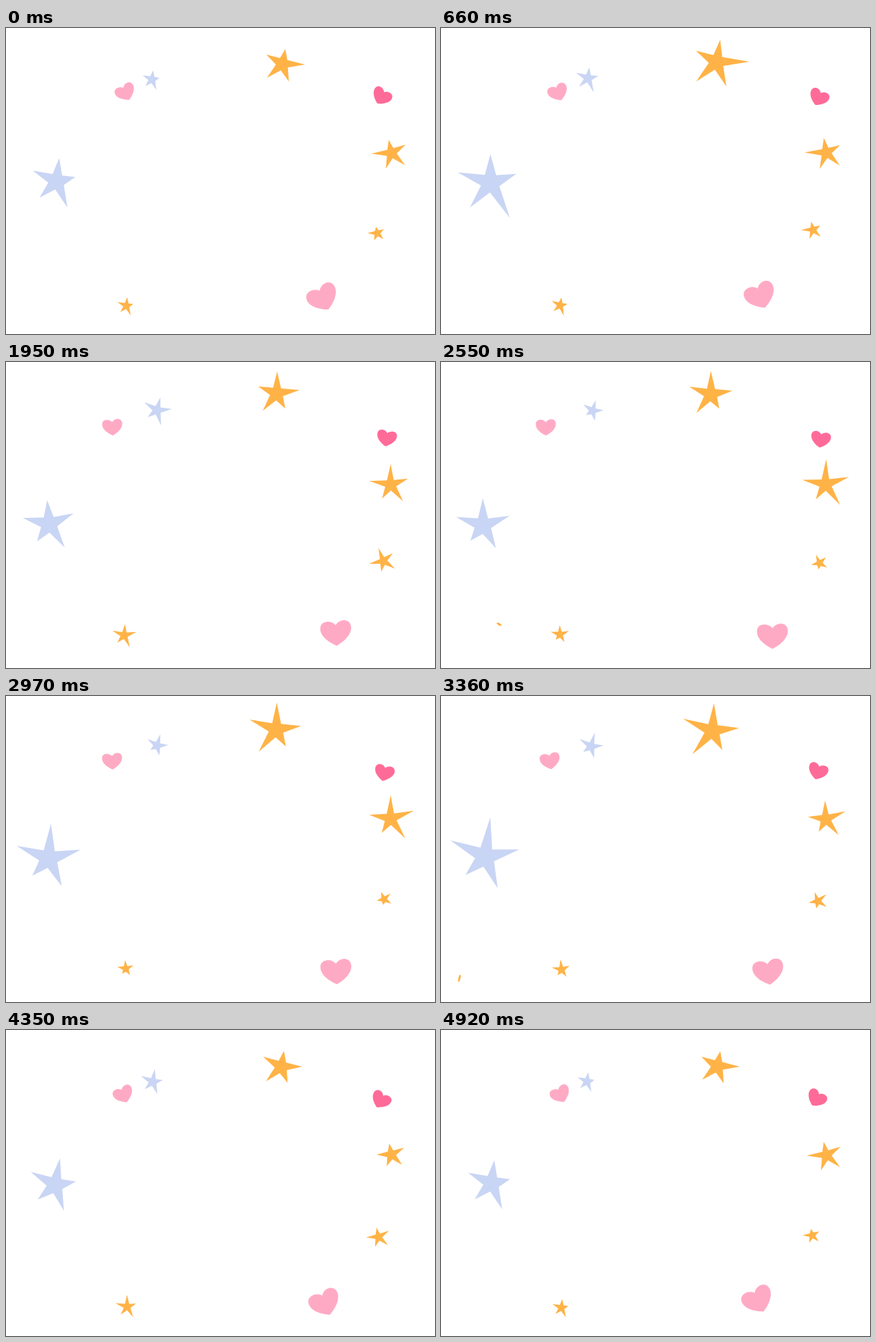
Animation of 645x461 px, one loop 4950 ms. Source, as an HTML page with a canvas:

```html
<!DOCTYPE html>
<html lang="en">
<head>
<meta charset="utf-8">
<title>Stars and hearts</title>
<style>
  html, body { margin: 0; width: 100%; height: 100%; overflow: hidden; background: #fff; }
  canvas { display: block; width: 645px; height: 461px; }
</style>
</head>
<body>
<canvas id="stage" width="645" height="461"></canvas>
<script>
const LOOP = 4950, STEP = 30;
const ORANGE = '#ffb347', BLUE = '#c9d5f4', PINK = '#ffaac5', ROSE = '#ff6b98', PURPLE = '#7a559b';
const ctx = document.getElementById('stage').getContext('2d');
const rad = degrees => degrees * Math.PI / 180;

// Mean value plus one swing per loop and, optionally, a second at double speed.
const wave = ([mean, c1, s1, c2 = 0, s2 = 0], a) =>
  mean + c1 * Math.cos(a) + s1 * Math.sin(a) + c2 * Math.cos(2 * a) + s2 * Math.sin(2 * a);

// The five tips of every star: reach, how far and when each one
// stretches during the loop, and its lean in degrees.
const TIPS = [
  { reach: 1.00, sway: 0.14, phase: 258, lean: -1.5 },
  { reach: 0.94, sway: 0.14, phase: 180, lean: -3 },
  { reach: 1.10, sway: 0.13, phase: 52, lean: 5 },
  { reach: 0.87, sway: 0.12, phase: 31, lean: 1.5 },
  { reach: 1.07, sway: 0.03, phase: 270, lean: -2 }
];

function star({ color, x, y, turn, size, body, flip = 1 }) {
  return a => {
    const length = wave(size, a);
    const inner = body + 0.17 * length;
    ctx.save();
    ctx.translate(wave(x, a), wave(y, a));
    ctx.rotate(rad(wave(turn, a)));
    ctx.scale(flip, 1);
    ctx.fillStyle = color;
    ctx.beginPath();
    const point = (r, degrees) => ctx.lineTo(r * Math.sin(rad(degrees)), -r * Math.cos(rad(degrees)));
    TIPS.forEach(({ reach, sway, phase, lean }, k) => {
      point(length * (reach + sway * Math.cos(a - rad(phase))), 72 * k + lean);
      point(inner, 72 * k + 36);
    });
    ctx.fill();
    ctx.restore();
  };
}

const heartPath = new Path2D('M0-12C3-17 9-19.6 14-18.8C20-18 23-13 23-8C23 4 10 14 0 19' +
  'C-10 14-23.5 5-23.5-7C-23.5-13-20-17-14-17.6C-9-18.3-3-16 0-12Z');

function heart({ color, x, y, turn, scale, flip = 1 }) {
  return a => {
    ctx.save();
    ctx.translate(wave(x, a), wave(y, a));
    ctx.rotate(rad(wave(turn, a)));
    ctx.scale(scale * flip, scale);
    ctx.fillStyle = color;
    ctx.fill(heartPath);
    ctx.restore();
  };
}

// A fleck of confetti that glints briefly.
function fleck(color, time, x, y, length, tilt) {
  return (a, t) => {
    if (Math.abs(t - time) > 75) return;
    ctx.fillStyle = color;
    ctx.beginPath();
    ctx.ellipse(x, y, length / 2, 1.6, rad(tilt), 0, Math.PI * 2);
    ctx.fill();
  };
}

const shapes = [
  star({ color: BLUE, body: 6.2, x: [68.9, 6.4, 0.5], y: [238, -7.5, -0.3],
    turn: [4.5, 3.8, -7], size: [44, -1, 0, -6.7, 5] }),
  star({ color: BLUE, body: 3, x: [223.2, -4.2, 0], y: [74.9, 2.2, -1.6],
    turn: [13.2, -5, -1.5], size: [19, -0.8, 2, -3.8, -1.5] }),
  star({ color: ORANGE, body: 4.8, x: [410, 5, 0.5], y: [51, 2.9, -2.8],
    turn: [-63.2, 5.4, 0], size: [35.5, -1.5, 1, -5, 4.5] }),
  star({ color: ORANGE, body: 3.6, flip: -1, x: [578.3, 0.7, 0], y: [186, 2, 0],
    turn: [64, -6.5, 0], size: [27, -4.7, 1, 3.3, 2.5] }),
  star({ color: ORANGE, body: 2.6, flip: -1, x: [563, -5.5, -0.8], y: [305.3, 3.3, -5.3],
    turn: [53, 6.5, 1], size: [16.2, -0.5, 2, -3.5, -3] }),
  star({ color: ORANGE, body: 2.5, x: [179.3, 1.2, -2], y: [414, 4, 0.7],
    turn: [3.7, 3, 7], size: [15.3, -0.2, 1, -1.6, -2.5] }),
  heart({ color: PINK, scale: 0.65, x: [168.3, 11.1, 0], y: [97.3, -0.7, 0], turn: [-13, -13, 0] }),
  heart({ color: PINK, scale: 1, x: [487.2, -10.9, 0], y: [409.2, -2.9, -5.6], turn: [-12.5, -12.5, 0] }),
  heart({ color: ROSE, scale: 0.64, flip: -1, x: [567.3, -3.3, 3], y: [109.6, -6.8, -0.8], turn: [18.5, 11.5, -3] }),
  fleck(PURPLE, 1380, 532, 395.5, 15, -10),
  fleck(ORANGE, 2550, 86.8, 394.5, 8, 30),
  fleck(ORANGE, 3360, 27.2, 424.8, 11, 104)
];

const start = performance.now();
function frame(now) {
  const t = Math.floor(Math.max(0, now - start) % LOOP / STEP) * STEP;
  const angle = 2 * Math.PI * t / LOOP;
  ctx.setTransform(1, 0, 0, 1, 0, 0);
  ctx.fillStyle = '#fff';
  ctx.fillRect(0, 0, 645, 461);
  ctx.translate(0.5, 0.5);
  shapes.forEach(draw => draw(angle, t));
  requestAnimationFrame(frame);
}
frame(start);
</script>
</body>
</html>
```
